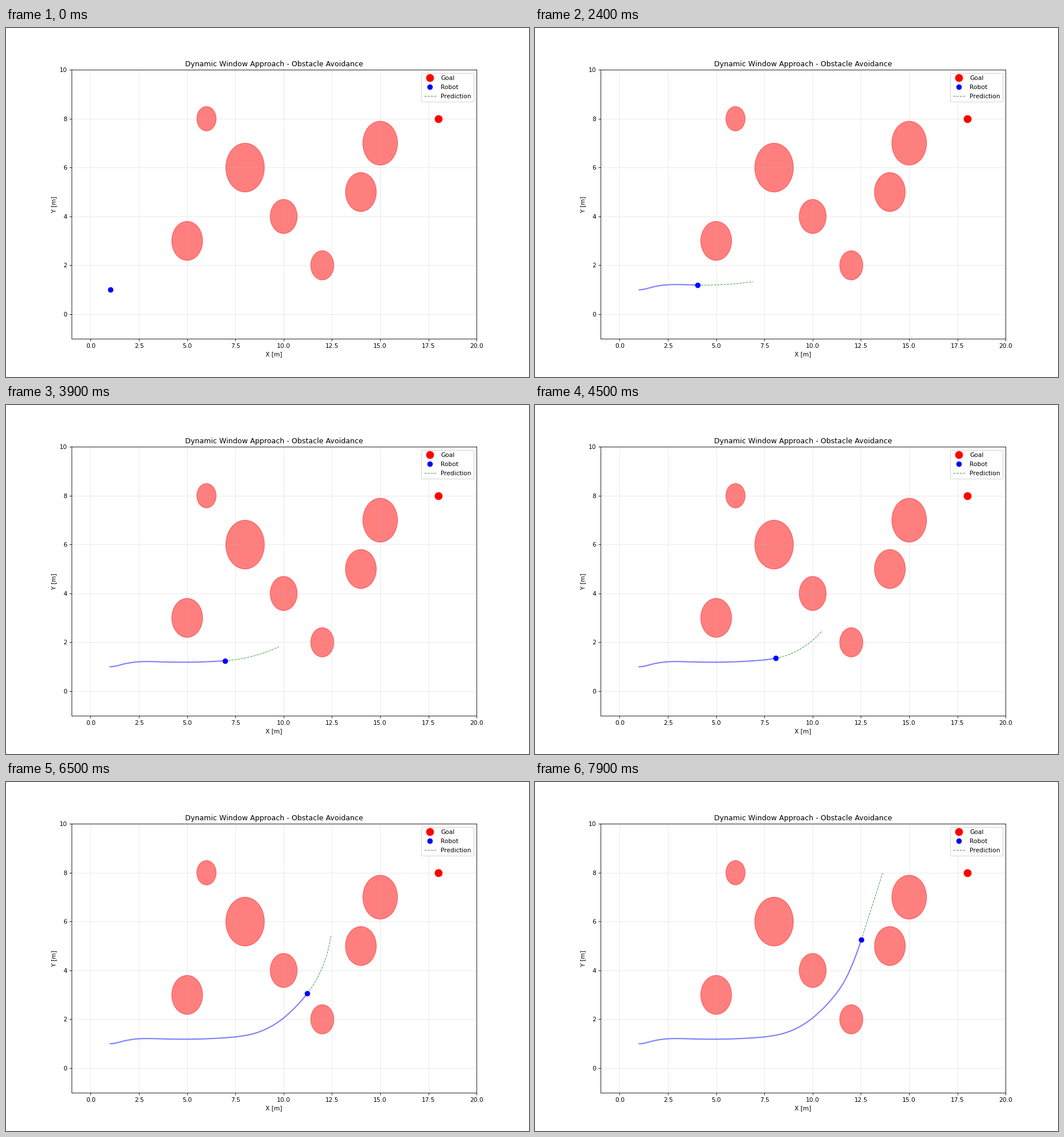
A matplotlib script that plays this animation: 917 by 611 pixels, repeating every 8 s.

```python
import matplotlib.pyplot as plt
import numpy as np
from matplotlib.animation import FuncAnimation
from matplotlib.patches import Circle

WIDTH, HEIGHT = 917, 611
DPI = WIDTH / 12
FRAMES, INTERVAL = 80, 100
DT = INTERVAL / 1000
HORIZON = 1.48  # seconds looked ahead

OBSTACLES = [(5, 3, 0.8), (8, 6, 1.0), (10, 4, 0.7), (12, 2, 0.6),
             (14, 5, 0.8), (15, 7, 0.9), (6, 8, 0.5)]
START, GOAL = (1.01, 1), (18, 8)


def ramp(keys):
    """Piecewise linear function of the step number."""
    steps, values = zip(*keys.items())
    return lambda k: np.interp(k, steps, values)


# Speed in m/s, heading and predicted turn in degrees
speed = ramp({0: 0.1, 18.4: 1.94, 40: 1.94, 45: 1.82,
              65: 1.82, 68: 1.45, 72: 2.0})
heading = ramp({0: 0, 9: 13, 18: 0, 21: -1.6, 28: 0, 40: 3.4,
                45: 8, 57: 34, 65: 45.5, 72: 61, 79: 68})
turn = ramp({0: 6, 12: -5, 24: 7.5, 36: 8.5, 45: 34, 65: 34, 79: 0})


def drive():
    """Robot positions for every step."""
    k = np.arange(FRAMES - 1)
    angle = np.radians(heading(k + 0.5))
    moves = DT * speed(k + 1) * np.array([np.cos(angle), np.sin(angle)])
    return np.array(START) + np.vstack([(0, 0), np.cumsum(moves.T, axis=0)])


def predict(k, n=40):
    """Arc travelled at constant speed and turn rate."""
    s = np.linspace(0, 1, n)
    half = np.radians(turn(k)) * s / 2
    chord = HORIZON * speed(k) * s * np.sinc(half / np.pi)
    angle = np.radians(heading(k)) + half
    x, y = path[k]
    return x + chord * np.cos(angle), y + chord * np.sin(angle)


path = drive()

fig, ax = plt.subplots(figsize=(12, (HEIGHT + 1e-6) / DPI), dpi=DPI)
ax.set(xlim=(-1, 20), ylim=(-1, 10), xlabel="X [m]", ylabel="Y [m]")
ax.set_title("Dynamic Window Approach - Obstacle Avoidance",
             fontsize=11.92, pad=5.5)
ax.tick_params(axis="x", pad=4)
ax.grid(True, alpha=0.3)

for x, y, r in OBSTACLES:
    ax.add_patch(Circle((x, y), r, color="r", alpha=0.5))

ax.plot(*GOAL, "ro", markersize=12, label="Goal")
trail, = ax.plot([], [], "b-", alpha=0.5, linewidth=2)
robot, = ax.plot([], [], "bo", markersize=8, zorder=3, label="Robot")
prediction, = ax.plot([], [], "g--", alpha=0.7, linewidth=1,
                      label="Prediction")
ax.legend(loc="upper right", labelspacing=0.55)


def update(k):
    trail.set_data(*path[:k + 1].T)
    robot.set_data(*path[k:k + 1].T)
    prediction.set_data(*predict(k))
    return trail, robot, prediction


anim = FuncAnimation(fig, update, frames=FRAMES, interval=INTERVAL,
                     repeat=True, repeat_delay=0)
plt.show()
```
